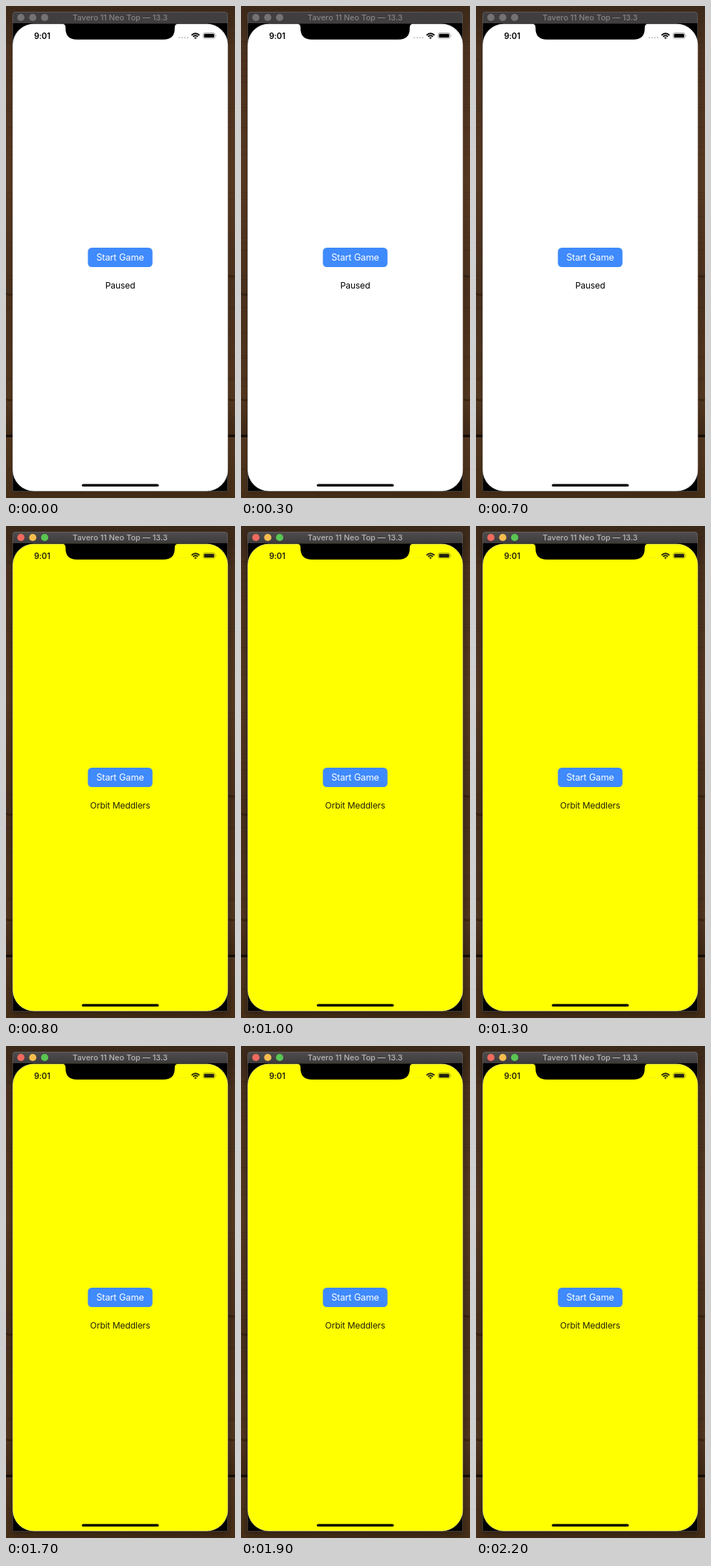
An HTML page for the animation above (2.3 s loop, 320 by 686 pixels).

```html
<!DOCTYPE html>
<html lang="en">
<head>
<meta charset="utf-8">
<title>Game launch screen</title>
<style>
  html, body { margin: 0; width: 100%; height: 100%; overflow: hidden; background: #4a301c; }
  svg { display: block; width: 320px; height: 686px; }
  text { font-family: Inter, "Open Sans", sans-serif; text-anchor: middle; }
</style>
</head>
<body>
<svg viewBox="0 0 320 686">
  <defs>
    <linearGradient id="wood" x2="0" y2="1">
      <stop offset="0" stop-color="#3d2a1a"/>
      <stop offset=".08" stop-color="#4d3320"/>
      <stop offset=".35" stop-color="#573a23"/>
      <stop offset=".58" stop-color="#4c321e"/>
      <stop offset=".8" stop-color="#533720"/>
      <stop offset=".87" stop-color="#432b18"/>
      <stop offset=".88" stop-color="#523620"/>
      <stop offset="1" stop-color="#483019"/>
    </linearGradient>
    <linearGradient id="titleBar" x2="0" y2="1">
      <stop offset="0" stop-color="#4f4d4e"/>
      <stop offset="1" stop-color="#3d3b3c"/>
    </linearGradient>
    <filter id="soft" x="-10%" y="-5%" width="120%" height="110%">
      <feGaussianBlur stdDeviation="5"/>
    </filter>
  </defs>

  <rect width="320" height="686" fill="url(#wood)"/>
  <g id="grain" fill="none" stroke="#25160c"/>
  <path d="M0 599.5H320" stroke="#170d07" stroke-width="3.5"/>
  <path d="M0 602.5H320" stroke="#68482e" stroke-width="1" opacity=".6"/>
  <rect id="shadow" x="7" y="10" width="306" height="672" rx="5" filter="url(#soft)"/>

  <path d="M9 677V12Q9 8 13 8H306Q310 8 310 12V677Z" fill="#000"/>
  <path id="bar" d="M9 24V12Q9 8 13 8H306Q310 8 310 12V24Z"/>
  <path d="M9.5 676.5V12Q9.5 8.5 13 8.5H306Q309.5 8.5 309.5 12V676.5Z" fill="none" stroke="#77706b" stroke-width=".7" opacity=".75"/>
  <g id="lights">
    <circle cx="20.8" cy="16" r="5.1"/>
    <circle cx="37.4" cy="16" r="5.1"/>
    <circle cx="54" cy="16" r="5.1"/>
  </g>
  <text id="title" x="159.5" y="20" font-size="11" font-weight="500">Tavero 11 Neo Top — 13.3</text>

  <rect id="screen" x="9.7" y="25.2" width="300" height="650.8" rx="29" stroke-width=".7"/>
  <path d="M79 24.8Q83.2 25.5 83.2 30V31Q83.2 46.8 99 46.8H220Q235.8 46.8 235.8 31V30Q235.8 25.5 240 24.8Z" fill="#000"/>

  <g id="ink">
    <text x="50.5" y="45.7" font-size="11.3" font-weight="600" letter-spacing="-.1">9:01</text>
    <g fill="none" stroke="currentColor" stroke-width="1.9">
      <path d="M259.3 40.7Q264.8 35.9 270.3 40.7"/>
      <path d="M261.4 42.8Q264.8 39.9 268.2 42.8"/>
    </g>
    <path d="M262.9 44.2Q264.8 42.7 266.7 44.2L264.8 46.1Z"/>
    <rect x="275.5" y="37.5" width="16.6" height="7.7" rx="2.2" fill="none" stroke="currentColor" stroke-width=".7" opacity=".5"/>
    <rect x="276.7" y="38.7" width="14.2" height="5.3" rx="1.2"/>
    <path d="M293 40Q294.5 41.3 293 42.7Z" opacity=".5"/>
  </g>
  <g id="dots">
    <circle cx="242.3" cy="44.2" r="1.1"/>
    <circle cx="246.2" cy="44.2" r="1.1"/>
    <circle cx="250" cy="44.2" r="1.1"/>
    <circle cx="253.8" cy="44.2" r="1.1"/>
  </g>

  <rect x="114.4" y="336.9" width="90.3" height="27.2" rx="5.5" fill="#3f8afc"/>
  <text x="159.5" y="355.2" font-size="12.8" letter-spacing="-.12" fill="#fff">Start Game</text>
  <text id="label" x="159.6" y="393.8" font-size="12.1" letter-spacing="-.1"></text>
  <rect x="106" y="666.4" width="107.5" height="3.7" rx="1.85" fill="#000"/>
</svg>

<script>
const LOOP = 2300, WAKE = 800;
const $ = id => document.getElementById(id);

const paused = {
  label: "Paused", screen: "#fff", edge: "#fff", ink: "#000", dots: "#c4c4c4",
  bar: "#403e3f", title: "#858384", shadow: .12,
  lights: ["#747273", "#747273", "#747273"]
};
const active = {
  label: "Orbit Meddlers", screen: "#ffff00", edge: "#ffff8c", ink: "#222210", dots: "#f0f020",
  bar: "url(#titleBar)", title: "#b8b6b7", shadow: .3,
  lights: ["#ef6a5e", "#f4bd4f", "#5ac553"]
};

function drawGrain() {
  let seed = 17;
  const random = () => (seed = seed * 16807 % 2147483647) / 2147483647;
  let marks = "";
  for (let i = 0; i < 60; i++) {
    const y = random() * 686, bend = random() * 6 - 3;
    marks += `<path d="M0 ${y}q80 ${bend} 160 0t160 0" stroke-width="${.4 + random()}" opacity="${.05 + random() * .18}"/>`;
  }
  for (const [x, y] of [[0, 401], [0, 548], [311, 376], [311, 548]])
    marks += `<path d="M${x} ${y}q4 3 9 1" stroke-width="3" opacity=".45"/>`;
  $("grain").innerHTML = marks;
}

let shown;
function render(time) {
  const state = time % LOOP < WAKE ? paused : active;
  if (state === shown) return;
  shown = state;
  for (const id of ["screen", "dots", "bar", "title", "ink"]) $(id).setAttribute("fill", state[id]);
  $("screen").setAttribute("stroke", state.edge);
  $("ink").setAttribute("color", state.ink);
  $("label").setAttribute("fill", state.ink);
  $("label").textContent = state.label;
  $("shadow").setAttribute("opacity", state.shadow);
  [...$("lights").children].forEach((light, i) => light.setAttribute("fill", state.lights[i]));
}

drawGrain();
const start = performance.now();
function tick() {
  render(performance.now() - start);
  requestAnimationFrame(tick);
}
tick();
</script>
</body>
</html>
```
